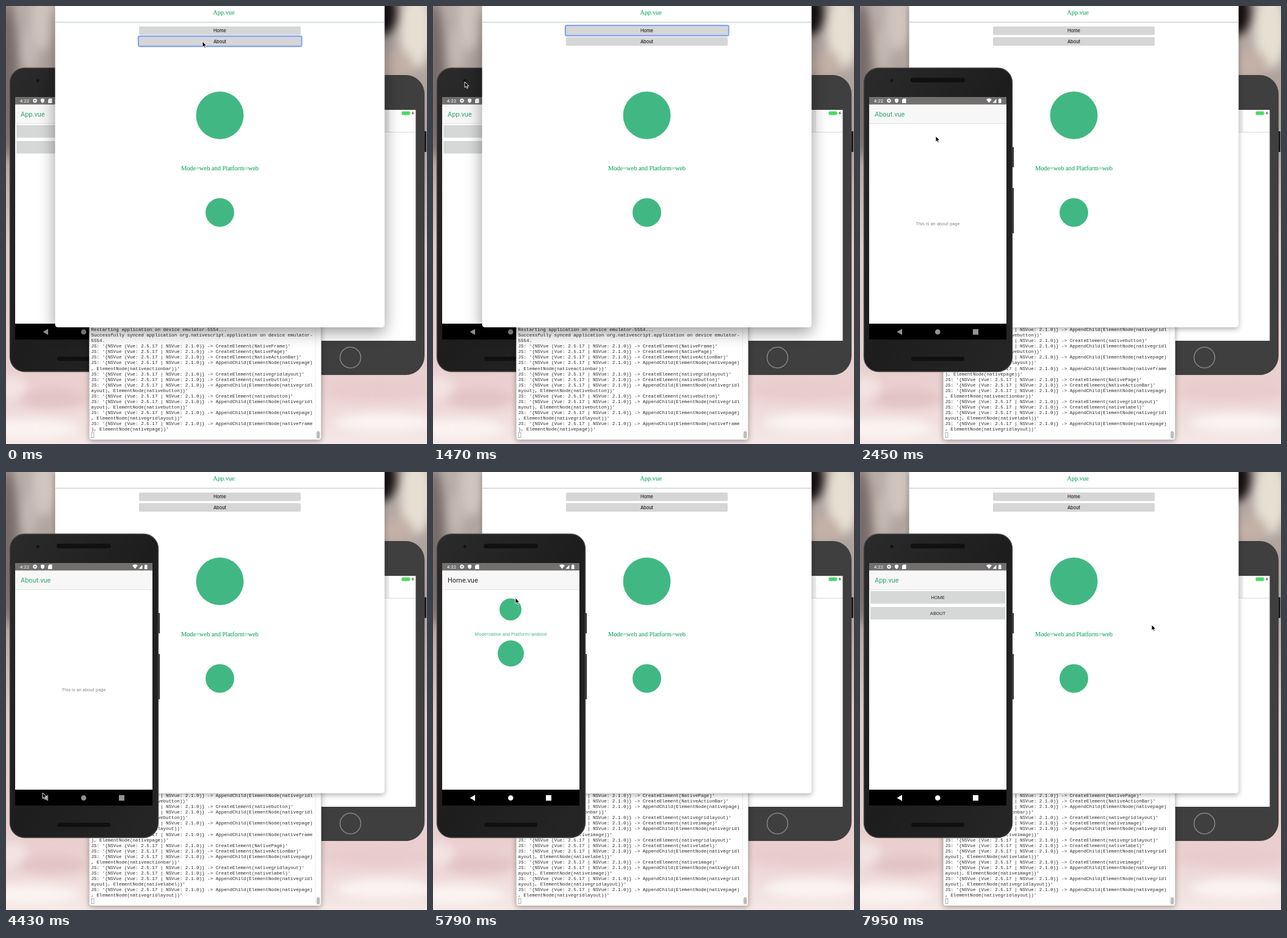
An HTML page that plays this animation: 690x717 px, repeating every 8000 ms.

```html
<!DOCTYPE html>
<html lang="en">
<head>
<meta charset="utf-8">
<title>One app on three screens</title>
<style>
  html, body { margin: 0; width: 100%; height: 100%; overflow: hidden; }
  svg { display: block; width: 690px; height: 717px; }
  .serif { font: 10.4px "Liberation Serif", serif; fill: #25ab6d; stroke: #25ab6d; stroke-width: .15; text-anchor: middle; }
  .label { font: 500 7.4px Inter, sans-serif; fill: #222; text-anchor: middle; }
  .roboto { font: 7.6px Roboto, sans-serif; text-anchor: middle; }
  .log { font: 7.57px "Liberation Mono", monospace; fill: #2b2b2b; }
  .blur { filter: blur(8px); }
  #terminal { filter: drop-shadow(0 2px 4px rgba(0, 0, 0, .35)); }
  #browser { filter: drop-shadow(0 3px 4px rgba(0, 0, 0, .3)); }
  #browser.active { filter: drop-shadow(0 8px 13px rgba(0, 0, 0, .4)); }
</style>
</head>
<body>
<svg id="stage" viewBox="0 0 690 717">
  <defs>
    <linearGradient id="wall" x2="0" y2="1">
      <stop offset="0" stop-color="#b9ada8"/>
      <stop offset=".3" stop-color="#a89c98"/>
      <stop offset=".55" stop-color="#dccbc8"/>
      <stop offset=".86" stop-color="#ead0d0"/>
      <stop offset="1" stop-color="#f5e8e7"/>
    </linearGradient>
    <linearGradient id="shell" x2="1" y2="1">
      <stop offset="0" stop-color="#2b2b2b"/>
      <stop offset=".5" stop-color="#1d1d1d"/>
      <stop offset="1" stop-color="#262626"/>
    </linearGradient>
  </defs>

  <rect width="690" height="717" fill="url(#wall)"/>
  <g class="blur">
    <ellipse cx="2" cy="120" rx="18" ry="130" fill="#776b69"/>
    <ellipse cx="62" cy="22" rx="20" ry="50" fill="#d0c5be"/>
    <ellipse cx="38" cy="70" rx="14" ry="34" fill="#c3b7b1"/>
    <ellipse cx="672" cy="40" rx="26" ry="62" fill="#e6dfd2"/>
    <ellipse cx="640" cy="95" rx="28" ry="22" fill="#c3b0a6"/>
    <ellipse cx="618" cy="10" rx="23" ry="38" fill="#141011"/>
    <ellipse cx="40" cy="692" rx="80" ry="16" fill="#faf3f2"/>
    <ellipse cx="75" cy="642" rx="60" ry="16" fill="#e2c3c4"/>
    <ellipse cx="10" cy="625" rx="24" ry="20" fill="#f2e3e2"/>
    <ellipse cx="610" cy="630" rx="90" ry="16" fill="#e8cbcb"/>
    <ellipse cx="620" cy="682" rx="80" ry="16" fill="#faf3f2"/>
  </g>

  <g id="tablet">
    <rect x="684" y="205" width="5" height="34" rx="1" fill="#1d1d1d"/>
    <rect x="420" y="113" width="266" height="491" rx="31" fill="#3f3f40"/>
    <rect x="435" y="170" width="236.500" height="378" fill="#fff"/>
    <rect x="435" y="170" width="193" height="36" fill="#f0f0f0"/>
    <path d="M435 206.500h236" stroke="#d3dade"/>
    <rect x="648.500" y="172.500" width="13.500" height="6" rx="1.500" fill="#4cd964"/>
    <path d="M663.300 174.500v2" stroke="#4cd964"/>
    <path d="M667.500 172l-2.300 3.800h1.700l-.7 3.200 2.300-4.300h-1.600z" fill="#222"/>
    <circle cx="564.500" cy="575.500" r="17" fill="none" stroke="#858585" stroke-width="1.500"/>
  </g>

  <g id="phone">
    <path d="M250.500 231v33M250.500 298v74" stroke="#2c2c2c" stroke-width="3"/>
    <rect x="6.500" y="101.500" width="243" height="497" rx="24" fill="url(#shell)" stroke="#454545" stroke-width="1.400"/>
    <rect x="83" y="117.500" width="89" height="7.500" rx="3.700" fill="#101010"/>
    <rect x="84" y="574" width="87" height="7" rx="3" fill="#101010"/>
    <circle cx="52" cy="122" r="2.500" fill="#131313"/>
    <rect x="15" y="149" width="225" height="397" fill="#fff"/>
    <rect x="15" y="149" width="225" height="12.500" fill="#72706f"/>
    <text x="30.500" y="158" class="roboto" fill="#fff" style="font-size:8px">4:22</text>
    <g fill="#fff">
      <circle cx="47.500" cy="155" r="2.100" fill="none" stroke="#fff" stroke-width="1.700"/>
      <circle cx="47.500" cy="155" r="3.200" fill="none" stroke="#fff" stroke-dasharray="1.200 1.310"/>
      <path d="M60 151.500l3 1v2.500q0 2.500-3 4q-3-1.500-3-4v-2.500z"/>
      <path d="M69 153.500l2-2h4.500v7.500h-6.500z"/>
      <path d="M207 153q4.500-3.500 9 0l-4.500 5.500z"/>
      <path d="M217.500 158.500l6-6.500v6.500z"/>
      <path d="M227 152.500h1.300v-1h2v1h1.200v6.500h-4.500z"/>
    </g>
    <rect x="15" y="161.500" width="225" height="30.500" fill="#f7f7f7"/>
    <path d="M15 192.500h225" stroke="#e2e2e2"/>
    <text id="title" x="24" y="181" class="roboto" style="font-size:11px;text-anchor:start"></text>

    <g id="app">
      <rect x="17" y="195" width="221.500" height="20.500" rx="1" fill="#d6d7d7"/>
      <rect x="17" y="221" width="221.500" height="20.500" rx="1" fill="#d6d7d7"/>
      <g class="roboto" fill="#2a2a2a" style="font-size:8px">
        <text x="127.500" y="208">HOME</text>
        <text x="127.500" y="234">ABOUT</text>
      </g>
    </g>
    <text id="about" x="127.500" y="359" class="roboto" fill="#8b8b8b">This is an about page</text>
    <g id="home" fill="#41b883">
      <circle cx="127" cy="225" r="18"/>
      <text x="127.500" y="268" class="roboto" style="font-size:7.500px">Mode=native and Platform=android</text>
      <circle cx="127.500" cy="297" r="21.500"/>
    </g>

    <rect x="15" y="520" width="225" height="26" fill="#000"/>
    <g id="keys">
      <path d="M60.500 533.500l8.500-5v10zM185 529h9v9h-9z"/>
      <circle cx="127.300" cy="533.500" r="4.300"/>
    </g>
  </g>

  <g id="terminal">
    <rect x="136.500" y="470" width="380" height="240" rx="4" fill="#fff" stroke="#c4c4c4" stroke-width=".6"/>
    <path d="M507.500 526v184" stroke="#eee"/>
    <rect x="509" y="696" width="5.500" height="12" rx="2.700" fill="#bdbdbd"/>
    <rect x="140" y="698.500" width="4" height="8" fill="none" stroke="#999" stroke-width=".8"/>
    <g id="log" class="log"></g>
  </g>

  <g id="browser" class="active">
    <path d="M80.500 0h540v521q0 5-5 5h-530q-5 0-5-5z" fill="#fff"/>
    <path id="rule" d="M80.500 26.500h540"/>
    <text x="357" y="14" class="serif">App.vue</text>
    <rect x="218" y="33.500" width="265" height="14" rx="2" fill="#d6d6d6"/>
    <rect x="218" y="51" width="265" height="14" rx="2" fill="#d6d6d6"/>
    <rect id="focus" x="217" width="267.500" height="16.500" rx="2" fill="none" stroke="#86a3f1" stroke-width="2.300"/>
    <text x="350.500" y="43" class="label">Home</text>
    <text x="350.500" y="60.500" class="label">About</text>
    <g id="webHome">
      <circle cx="350.500" cy="179" r="39" fill="#41b883"/>
      <text x="350.500" y="269" class="serif">Mode=web and Platform=web</text>
      <circle cx="350.500" cy="338" r="23.500" fill="#41b883"/>
    </g>
    <text id="webAbout" x="350.500" y="98" class="serif">This is an about page</text>
  </g>

  <path id="cursor" d="M0 0v9.500l2.200-2 1.500 3.300 1.600-.7-1.500-3.200h3z" fill="#000" stroke="#fff" stroke-width=".9"/>
</svg>

<script>
const $ = id => document.getElementById(id);
const show = (id, on) => $(id).style.display = on ? '' : 'none';

// Log output, wrapped at the terminal's 80 columns
const entry = text => `JS: '{NSVue (Vue: 2.5.17 | NSVue: 2.1.0)} -> ${text}'`;
const create = name => entry(`CreateElement(${name})`);
const append = (parent, child) =>
  entry(`AppendChild(ElementNode(native${parent}), ElementNode(native${child}))`);
const addToGrid = name => [create('native' + name), append('gridlayout', name)];
const pageStart = [create('NativePage'), create('NativeActionBar'),
  append('page', 'actionbar'), create('nativegridlayout')];
const pageEnd = append('page', 'gridlayout');

const startLog = [
  'Restarting application on device emulator-5554...',
  'Successfully synced application org.nativescript.application on device emulator-5554.',
  create('NativeFrame'), ...pageStart, ...addToGrid('button'), ...addToGrid('button'),
  pageEnd, append('frame', 'page')];
const aboutLog = [...startLog, ...pageStart, ...addToGrid('label'), pageEnd];
const homeLog = [...aboutLog, ...pageStart, ...addToGrid('image'),
  create('nativegridlayout'), ...addToGrid('label'), ...addToGrid('image'),
  append('gridlayout', 'gridlayout'), pageEnd];

const ROWS = 19;
const rows = Array.from({ length: ROWS }, (_, i) => {
  const row = document.createElementNS('http://www.w3.org/2000/svg', 'text');
  row.setAttribute('x', 139.5);
  row.setAttribute('y', 532 + i * 9.08);
  return $('log').appendChild(row);
});
let shownLog;
function printLog(log) {
  if (log === shownLog) return;
  shownLog = log;
  const lines = log.flatMap(text => text.match(/.{1,80}/g)).slice(-ROWS);
  rows.forEach((row, i) => row.textContent = lines[i]);
}

// Pointer stops: time, x, y
const stops = [
  [0, 322, 58], [200, 322, 58], [490, 322, 41], [1080, 322, 41], [1470, 52, 124],
  [1670, 52, 124], [1960, 124, 228], [2160, 124, 228], [2450, 124, 213],
  [2950, 124, 213], [3335, 58, 183], [3930, 58, 183], [4415, 60, 525],
  [4910, 60, 525], [5390, 135, 206], [6380, 135, 206], [6960, 63, 530],
  [7360, 63, 530], [7940, 478, 250]];
function pointerAt(t) {
  const next = stops.findIndex(stop => stop[0] > t);
  if (next < 0) return stops.at(-1).slice(1);
  const [t0, x0, y0] = stops[next - 1], [t1, x1, y1] = stops[next];
  const k = (t - t0) / (t1 - t0), ease = k * k * (3 - 2 * k);
  return [x0 + (x1 - x0) * ease, y0 + (y1 - y0) * ease];
}

const LOOP = 8000, STEP = 98.1;
let phoneWasFront;
function draw(now) {
  const t = Math.floor((now % LOOP + 8) / STEP) * STEP;
  const between = (from, to) => t >= from && t < to;

  const phoneFront = t >= 1660;
  if (phoneFront !== phoneWasFront) {
    phoneWasFront = phoneFront;
    $('stage').insertBefore($('phone'), $(phoneFront ? 'cursor' : 'terminal'));
    $('browser').classList.toggle('active', !phoneFront);
    $('rule').setAttribute('stroke', phoneFront ? '#c0c0c0' : '#b3c6c1');
    show('focus', !phoneFront);
  }
  $('focus').setAttribute('y', t < 580 ? 49.5 : 32);
  const webAbout = between(95, 580);
  show('webAbout', webAbout);
  show('webHome', !webAbout);

  const page = between(2250, 4700) ? 'about' : between(5680, 7350) ? 'home' : 'app';
  for (const id of ['app', 'about', 'home']) show(id, id === page);
  $('title').textContent = page[0].toUpperCase() + page.slice(1) + '.vue';
  $('title').setAttribute('fill', page === 'home' ? '#222' : '#2fa872');
  $('keys').setAttribute('fill', t < 4600 ? '#929292' : '#fff');
  printLog(t < 2250 ? startLog : t < 5680 ? aboutLog : homeLog);

  $('cursor').setAttribute('transform', `translate(${pointerAt(t)})`);
}

function tick() {
  draw(performance.now());
  requestAnimationFrame(tick);
}
tick();
</script>
</body>
</html>
```
